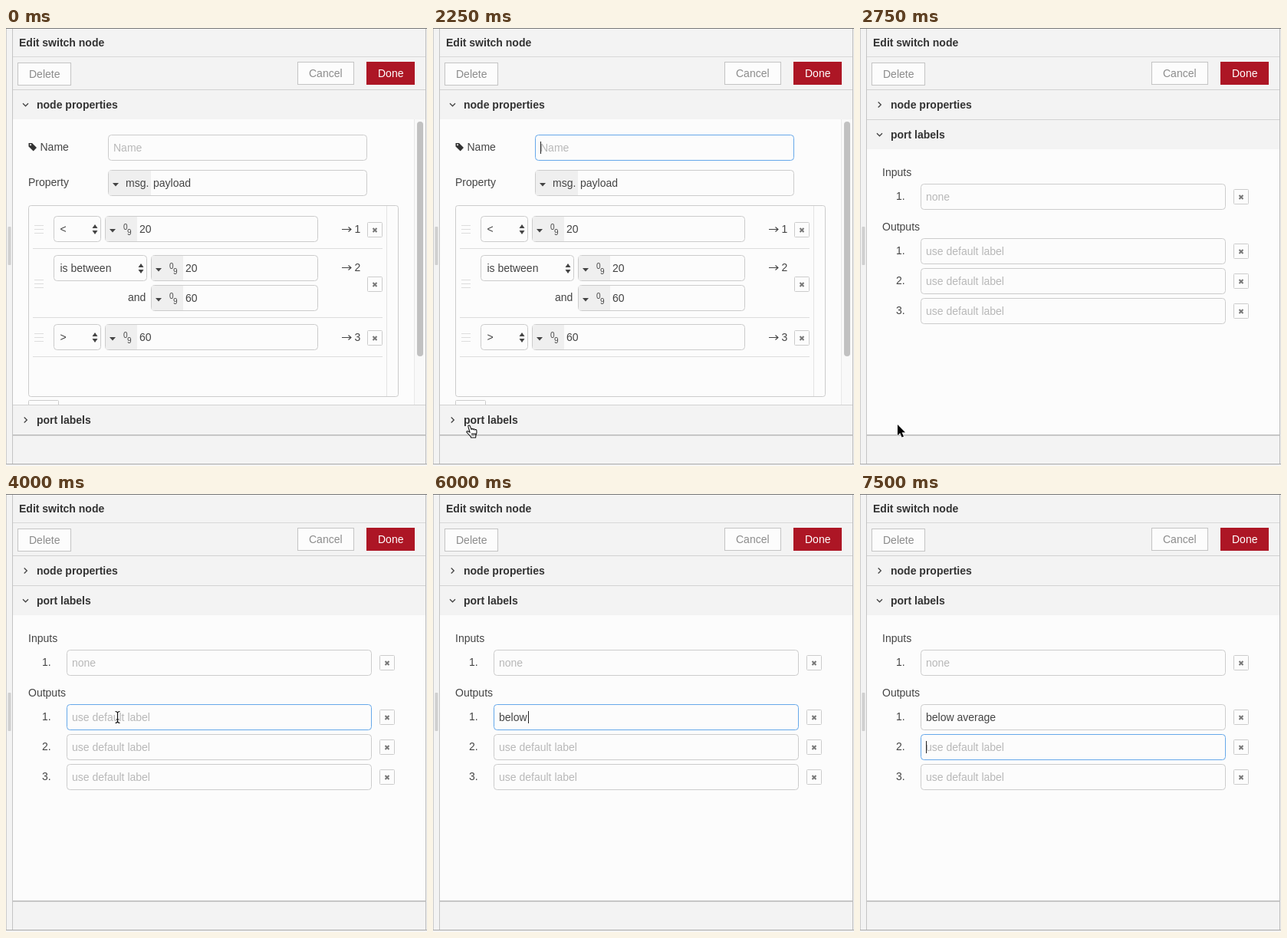
Write an HTML page that moves like this. It is 549 px wide and 571 px high and loops after 8000 ms.

```html
<!DOCTYPE html>
<html lang="en">
<head>
<meta charset="utf-8">
<title>Edit switch node</title>
<style>
  html, body { margin: 0; width: 100%; height: 100%; overflow: hidden; background: #f3f3f3; }
  svg { display: block; font: 14px "Liberation Sans", Arial, sans-serif; }
</style>
</head>
<body>
<svg id="stage" width="549" height="571" viewBox="0 0 549 571"></svg>
<script>
const stage = document.getElementById('stage');
const ruler = document.createElement('canvas').getContext('2d');
ruler.font = '14px "Liberation Sans", Arial, sans-serif';

const PANEL = '#f3f3f3', PAPER = '#fcfcfc', BORDER = '#ccc', FOCUS = '#66a8ea', INK = '#444', HINT = '#b8b8b8';
const LOOP = 8000, STEP = 250, PHRASE = 'below average';

// Basic pieces
const text = (x, y, s, fill = INK, extra = '') => `<text x="${x}" y="${y}" fill="${fill}" ${extra}>${s}</text>`;
const bold = (x, y, s) => text(x, y, s, '#333', 'font-weight="bold"');
const rect = (x, y, w, h, fill) => `<rect x="${x}" y="${y}" width="${w}" height="${h}" fill="${fill}"/>`;
const box = (x, y, w, h, r = 4, stroke = BORDER) =>
  `<rect x="${x + .5}" y="${y + .5}" width="${w - 1}" height="${h - 1}" rx="${r}" fill="${PAPER}" stroke="${stroke}"/>`;
const path = (d, fill, stroke = 'none', width = 1, extra = '') =>
  `<path d="${d}" fill="${fill}" stroke="${stroke}" stroke-width="${width}" ${extra}/>`;
const at = (x, y, body) => `<g transform="translate(${x} ${y})">${body}</g>`;
const caret = (x, y) => rect(x, y, 1, 16, '#222');

// Form controls
const button = (x, y, w, label) => box(x, y, w, 30, 0, '#c4c4c4') + text(x + 15, y + 20, label, '#8c8c8c');
const removeButton = (x, y) => box(x, y, 20, 20, 1) +
  path(`M${x + 7.5} ${y + 8}l5 5m0 -5l-5 5`, 'none', '#777', 2);
const field = (x, y, w, value, hint, focused) =>
  box(x, y, w, 34, 4, focused ? FOCUS : BORDER) + text(x + 7, y + 22, value || hint, value ? INK : HINT);
const typedField = (x, y, w, segment) => box(x, y, w, 34) + rect(x + 1, y + 1, segment, 32, '#efefef') +
  path(`M${x + 6} ${y + 17}h8l-4 4.5z`, INK);
const numberField = (x, y, value) => typedField(x, y, 407 - x, 41) +
  text(x + 24, y + 18, 0, INK, 'font-size="10"') + text(x + 29, y + 25, 9, INK, 'font-size="10"') +
  text(x + 45, y + 22, value);
const select = (y, w, label) => box(62, y, w, 34) + text(70.5, y + 22, label) +
  path(`M${w + 50.5} ${y + 16}h7l-3.5 -5zm0 3h7l-3.5 5z`, INK);
const ruleRow = (handleY, arrowY, removeY, lineY, port) =>
  path([0, 5, 10].map(d => `M37 ${handleY + d + .5}h12`).join(''), 'none', '#ddd') +
  path(`M438 ${arrowY + .5}h12m-3.5 -3l3.5 3l-3.5 3`, 'none', INK, 1.1) +
  text(454.5, arrowY + 5, port) + removeButton(471, removeY) + rect(35, lineY, 456, 1, '#ddd');

// "turn" runs from 0 (open, pointing down) to 1 (closed, pointing right)
const header = (y, label, turn) => rect(9, y, 538, 39, PANEL) + rect(9, y, 538, 1, '#d2d2d2') +
  path('M-3.5 -1.8L0 1.8L3.5 -1.8', 'none', INK, 1.3,
    `transform="translate(25.5 ${y + 20}) rotate(${-90 * turn})"`) +
  bold(40, y + 25, label);

// Pointers
const pointers = {
  arrow: path('M0 0V14L3.2 11L5.6 16.5L8 15.4L5.6 10.2H10Z', '#000', '#fff', 1, 'paint-order="stroke"'),
  hand: path('M5 10L2.9 2.7C2.5 1 4.6 .4 5.3 1.9L7 6.2C7.5 5.1 9 5.1 9.4 6.4C9.9 5.4 11.2 5.6 11.6 6.9' +
    'C12.3 6.1 13.7 6.5 13.9 7.8C14.3 10.5 14.2 12 12.9 14.2L12.6 17H6.6L6 15.2C4 13.6 2.6 11.8 1.1 10.2' +
    'C.2 9 1.8 8 3.1 9ZM8 11v3.4M10 11v3.4M12 11v3', '#fff', '#111', 1.1),
  beam: [['#fff', 3], ['#111', 1.2]].map(([color, width]) =>
    path('M-3 -7.5Q0 -7.5 0 -5V5Q0 7.5 -3 7.5M3 -7.5Q0 -7.5 0 -5M0 5Q0 7.5 3 7.5M-2 3H2', 'none', color, width)).join('')
};
// Each entry holds from its step until the next one
const pointerPath = [
  [2, 'arrow', 255, 73], [3, 'hand', 236, 89], [4, 'hand', 217, 107], [5, 'beam', 208, 192],
  [6, 'arrow', 222, 270], [7, 'arrow', 244, 400], [8, 'arrow', 163, 523], [9, 'hand', 43, 517],
  [11, 'arrow', 49, 517], [12, 'beam', 132, 325], [13, 'beam', 145.5, 291], [22]
];
function pointer(step) {
  const [, shape, x, y] = pointerPath.filter(p => p[0] <= step).pop() || [];
  return shape ? at(x, y, pointers[shape]) : '';
}

function frame() {
  return rect(0, 0, 549, 571, PANEL) + rect(0, 0, 549, 1, '#777') + rect(0, 1, 1, 567, '#ccc') +
    rect(8, 1, 1, 567, '#c4c4c4') + rect(547, 1, 1, 567, '#bbb') + rect(0, 568, 549, 1, '#aaa') +
    `<rect x="2.5" y="259" width="4" height="50" rx="1" fill="#d0d0d0"/>` +
    bold(17, 24, 'Edit switch node') + rect(9, 37, 538, 1, '#d8d8d8') +
    button(15, 45, 70, 'Delete') + button(380, 44, 74, 'Cancel') +
    rect(470, 44, 63, 30, '#ad1625') + text(485, 64, 'Done', '#fff');
}

function propertiesPane(step) {
  const focused = step > 0;
  return rect(9, 119, 538, 372, PAPER) +
    path('M29.5 150h4.5l6 6l-4.3 4.5l-6.2 -6zM32 151.3a1 1 0 1 0 .1 0z', '#333', 'none', 0, 'fill-rule="evenodd"') +
    text(44.5, 160, 'Name') + field(133, 139, 338, '', 'Name', focused) +
    (focused && step % 4 < 2 ? caret(140, 148) : '') +
    text(29, 206, 'Property') + typedField(133, 185, 338, 55) +
    text(156, 207, 'msg.') + text(192, 207, 'payload') +
    box(29, 231, 483, 250, 3) + rect(496, 232, 1, 248, '#e4e4e4') +
    select(245, 62, '&lt;') + numberField(129, 245, 20) + ruleRow(257, 262, 253, 287, 1) +
    select(296, 122, 'is between') + numberField(189, 296, 20) +
    text(159, 356, 'and') + numberField(189, 335, 60) + ruleRow(328, 312, 324, 377, 2) +
    select(386, 62, '&gt;') + numberField(129, 386, 60) + ruleRow(398, 403, 394, 428, 3) +
    box(29, 485, 40, 20, 1) +
    rect(532, 119, 15, 372, '#f9f9f9') + rect(532, 119, 1, 372, '#e8e8e8') +
    '<rect x="536" y="122" width="8" height="306" rx="4" fill="#c1c1c1"/>';
}

function labelsPane(step) {
  const typing = step >= 22 && step < 30;
  const typed = step < 22 ? '' : PHRASE.slice(0, Math.round(5 + 1.6 * (step - 24)));
  const active = step >= 30 ? 1 : step >= 14 ? 0 : -1;
  const lit = active >= 0 && (typing || step % 4 >= 2);
  const caretX = 86 + (typing ? Math.round(ruler.measureText(typed).width) + 1 : 0);
  const row = (y, number, value, hint, focused) => text(47, y + 21, number + '.') +
    field(79, y, 398, value, hint, focused) + removeButton(487, y + 7);
  return rect(9, 158, 538, 373, PAPER) + text(29, 193, 'Inputs') + row(203, 1, '', 'none') +
    text(29, 264, 'Outputs') +
    [0, 1, 2].map(i => row(274 + 39 * i, i + 1, i ? '' : typed, 'use default label', i === active)).join('') +
    (lit ? caret(caretX, 283 + 39 * active) : '');
}

function draw(step) {
  const slide = step < 10 ? 0 : step === 10 ? .5 : 1;
  const headerY = 491 - 372 * slide;
  stage.innerHTML = frame() +
    `<clipPath id="upper"><rect x="9" y="119" width="538" height="${headerY - 119}"/></clipPath>` +
    '<clipPath id="lower"><rect x="9" y="81" width="538" height="450"/></clipPath>' +
    (slide < 1 ? `<g clip-path="url(#upper)">${propertiesPane(step)}</g>` : '') +
    header(80, 'node properties', slide) +
    `<g clip-path="url(#lower)">${at(0, headerY - 119, labelsPane(step))}${header(headerY, 'port labels', 1 - slide)}</g>` +
    rect(9, 530, 538, 1.5, '#b8b8b8') + pointer(step);
}

let shown = -1;
function tick() {
  const step = Math.floor(performance.now() % LOOP / STEP);
  if (step !== shown) draw(shown = step);
  requestAnimationFrame(tick);
}
tick();
</script>
</body>
</html>
```
